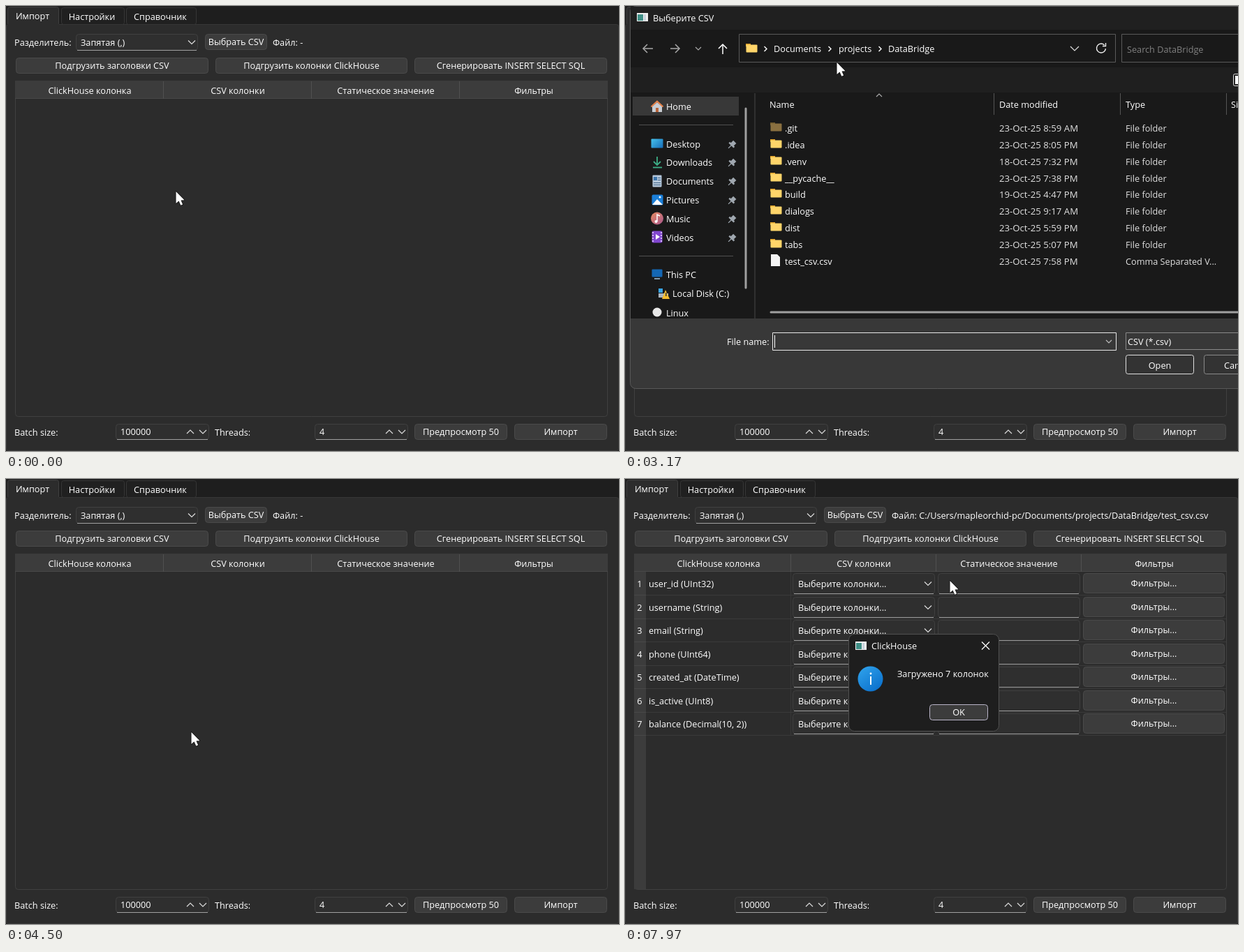
Write an HTML page with a canvas that moves like this. It is 878 by 638 pixels and loops after 8 s.

```html
<!DOCTYPE html>
<html lang="ru">
<meta charset="utf-8">
<title>CSV import</title>
<style>
html, body { margin: 0; width: 100%; height: 100%; overflow: hidden; background: #2c2c2c; }
canvas { display: block; }
</style>
<canvas id="stage" width="878" height="638"></canvas>
<script>
const ctx = document.getElementById('stage').getContext('2d');
const TICK = 200 / 3, LOOP = 8000;
const PATH = 'C:/Users/mapleorchid-pc/Documents/projects/DataBridge/test_csv.csv';

// Cursor way points: time, x, y
const WAY = [
  [0, 243, 266], [433, 243, 266], [1300, 268, 90], [1900, 312, 49], [2900, 312, 49],
  [3300, 296, 111], [3770, 273, 324], [4050, 265, 363], [4700, 265, 363], [5570, 212, 106],
  [5700, 207, 88], [5900, 207, 88], [6430, 467, 333], [6620, 520, 337], [6900, 520, 337],
  [7480, 440, 86], [7680, 440, 86], [7970, 465, 147], [8000, 467, 152],
];

const FILES = [
  ['.git', '23-Oct-25 8:59 AM'], ['.idea', '23-Oct-25 8:05 PM'], ['.venv', '18-Oct-25 7:32 PM'],
  ['__pycache__', '23-Oct-25 7:38 PM'], ['build', '19-Oct-25 4:47 PM'], ['dialogs', '23-Oct-25 9:17 AM'],
  ['dist', '23-Oct-25 5:59 PM'], ['tabs', '23-Oct-25 5:07 PM'], ['test_csv.csv', '23-Oct-25 7:58 PM'],
];
const COLUMNS = ['user_id (UInt32)', 'username (String)', 'email (String)', 'phone (UInt64)',
  'created_at (DateTime)', 'is_active (UInt8)', 'balance (Decimal(10, 2))'];
const HEADERS = ['ClickHouse колонка', 'CSV колонки', 'Статическое значение', 'Фильтры'];

let now = 0, modal = false;

// Monotone cubic through the way points
function cursorAt(t) {
  let i = 0;
  while (i < WAY.length - 2 && t >= WAY[i + 1][0]) i++;
  const slope = (k, c) => k < 0 || k > WAY.length - 2 ? 0
    : (WAY[k + 1][c] - WAY[k][c]) / (WAY[k + 1][0] - WAY[k][0]);
  const tangent = (k, c) => {
    const a = slope(k - 1, c), b = slope(k, c);
    return a * b > 0 ? 2 * a * b / (a + b) : 0;
  };
  const [t0] = WAY[i], span = WAY[i + 1][0] - t0;
  const u = Math.max(0, (t - t0) / span), v = 1 - u;
  return [1, 2].map(c => v * v * (1 + 2 * u) * WAY[i][c] + u * u * (3 - 2 * u) * WAY[i + 1][c]
    + span * u * v * (v * tangent(i, c) - u * tangent(i + 1, c)));
}

const between = (a, b) => now >= a && now < b;

function text(s, x, y, align = 'left', color = '#fff', size = 12.7) {
  ctx.font = `${size}px "Open Sans", "Noto Sans", sans-serif`;
  ctx.textAlign = align;
  ctx.fillStyle = color;
  ctx.fillText(s, x, y + 5);
}

function rect(x, y, w, h, color) {
  ctx.fillStyle = color;
  ctx.fillRect(x, y, w, h);
}

function box(x, y, w, h, radius, fill, stroke) {
  ctx.beginPath();
  ctx.roundRect(x + .5, y + .5, w - 1, h - 1, radius);
  if (fill) { ctx.fillStyle = fill; ctx.fill(); }
  if (stroke) { ctx.strokeStyle = stroke; ctx.lineWidth = 1; ctx.stroke(); }
}

function line(color, width, ...p) {
  ctx.beginPath();
  for (let i = 0; i < p.length; i += 2) ctx.lineTo(p[i], p[i + 1]);
  ctx.strokeStyle = color;
  ctx.lineWidth = width;
  ctx.stroke();
}

function shape(color, ...p) {
  ctx.beginPath();
  for (let i = 0; i < p.length; i += 2) ctx.lineTo(p[i], p[i + 1]);
  ctx.fillStyle = color;
  ctx.fill();
}

function disc(x, y, r, color) {
  ctx.beginPath();
  ctx.arc(x, y, r, 0, 7);
  ctx.fillStyle = color;
  ctx.fill();
}

const chevron = (x, y, s = 5, dir = 1, color = '#ddd') =>
  line(color, 1.2, x - s, y - dir * s / 2, x, y + dir * s / 2, x + s, y - dir * s / 2);
const crumb = x => line('#fff', 1.4, x - 1.5, 58, x + 2, 61.5, x - 1.5, 65);

// Share of the last moments that the cursor spent over the area
function hoverLevel(x, y, w, h) {
  let level = 0;
  for (let k = 0; k < 4; k++) {
    const [cx, cy] = cursorAt(now - k * 45);
    if (cx >= x && cx < x + w && cy >= y && cy < y + h) level += .25;
  }
  const pressed = between(2820, 2960) || between(5820, 5950) || between(6820, 6960) || between(7620, 7760);
  return pressed ? level * .5 : level;
}

function button(x, y, w, h, label, active = !modal, border = '#4a4a4a') {
  box(x, y, w, h, 4, '#3c3c3c', border);
  const level = active ? hoverLevel(x, y, w, h) : 0;
  if (level) box(x, y, w, h, 4, `rgba(255,255,255,${.42 * level})`);
  text(label, x + w / 2, y + h / 2 | 0, 'center');
}

function field(x, y, w, h, value = '') {
  box(x, y, w, h, 4, '#2f2f2f', '#404040');
  line('#a0a0a0', 1, x + 2, y + h - .5, x + w - 2, y + h - .5);
  text(value, x + 7, y + h / 2 | 0);
}

function spin(x, value) {
  field(x, 599, 134, 23, value);
  chevron(x + 107, 610.5, 5, -1);
  chevron(x + 125, 610.5);
}

function mainWindow() {
  rect(0, 0, 878, 638, '#1e1e1e');
  box(0, 26, 878, 612, 3, '#2c2c2c', '#383838');
  box(79, 2, 91, 25, 3, '#202020', '#363636');
  box(172, 2, 101, 25, 3, '#202020', '#363636');
  box(2, 1, 74, 28, 3, '#2c2c2c', '#414141');
  rect(2, 26, 74, 4, '#2c2c2c');
  text('Импорт', 38, 14, 'center');
  text('Настройки', 123, 15, 'center');
  text('Справочник', 221, 15, 'center');

  text('Разделитель:', 12, 52);
  field(100, 40, 175, 24, 'Запятая (,)');
  chevron(266, 52);
  button(285, 40, 89, 23, 'Выбрать CSV');
  text('Файл: ' + (now > 4560 ? PATH : '-'), 382, 52);
  button(14, 74, 276, 23, 'Подгрузить заголовки CSV');
  button(300, 74, 275, 23, 'Подгрузить колонки ClickHouse');
  button(585, 74, 276, 23, 'Сгенерировать INSERT SELECT SQL');

  table(now > 7760);

  text('Batch size:', 12, 611);
  spin(157, '100000');
  text('Threads:', 299, 611);
  spin(442, '4');
  button(585, 599, 133, 23, 'Предпросмотр 50');
  button(728, 599, 133, 23, 'Импорт');
}

function table(filled) {
  const left = filled ? 30 : 14, step = filled ? 208 : 212;
  box(13, 107, 849, 482, 4, '#2c2c2c', '#404040');
  rect(13, 107, 849, 26, '#3c3c3c');
  if (filled) rect(13, 133, 17, 455, '#3c3c3c');
  line('#484848', 1, 13, 132.5, 862, 132.5);
  HEADERS.forEach((title, i) => {
    text(title, left + step * (i + .5) | 0, 121, 'center');
    if (i) line('#505050', 1, left + step * i - .5, 108, left + step * i - .5, 133);
  });
  if (!filled) return;
  line('#383838', 1, 237.5, 133, 237.5, 368);
  COLUMNS.forEach((name, i) => {
    const y = Math.round(150 + i * 33.55), bottom = y + 16.5;
    line('#484848', 1, 13, bottom, 30, bottom);
    line('#3a3a3a', 1, 30, bottom, 861, bottom);
    text(i + 1, 21, y, 'center');
    text(name, 34, y);
    field(240, y - 15, 204, 30);
    text('Выберите колонки...', 248, y);
    chevron(434, y);
    field(448, y - 15, 204, 30);
    button(656, y - 15, 203, 29, 'Фильтры...', false);
  });
}

function appIcon(x, y) {
  rect(x, y, 16, 12, '#f0f0f0');
  rect(x + 1, y + 2, 8, 9, '#3f8f86');
  rect(x + 10, y + 2, 3, 9, '#c9d3dc');
}

function folder(x, y, dim) {
  rect(x, y - 6, 7, 4, dim ? '#6f5a2c' : '#e3a52c');
  box(x, y - 5, 17, 12, 1, dim ? '#8a7040' : '#ffd56a');
}

function pin(x, y) {
  ctx.save();
  ctx.translate(x, y);
  ctx.rotate(Math.PI / 4);
  rect(-3, -6, 6, 6, '#a0a8b0');
  rect(-5, -1, 10, 2.5, '#a0a8b0');
  rect(-.6, 1, 1.2, 6, '#a0a8b0');
  ctx.restore();
}

function sidebar() {
  rect(11, 130, 152, 27, '#383838');
  shape('#c9ced4', 39, 144, 46, 138, 53, 144, 53, 152, 39, 152);
  line('#e8834a', 2, 37.5, 144.5, 46, 136.5, 54.5, 144.5);
  rect(44, 146, 4, 6, '#b8643a');
  text('Home', 59, 144);
  line('#505050', 1, 20, 170.5, 155, 170.5);
  line('#505050', 1, 20, 358.5, 155, 358.5);
  box(171, 145, 4, 261, 2, '#a0a0a0');
  ['Desktop', 'Downloads', 'Documents', 'Pictures', 'Music', 'Videos'].forEach((name, i) => {
    const y = Math.round(197.5 + i * 26.8);
    text(name, 59, y);
    pin(153, y + 1);
  });
  const blue = ctx.createLinearGradient(38, 190, 54, 206);
  blue.addColorStop(0, '#46c3ee');
  blue.addColorStop(1, '#1467b4');
  box(37, 190, 18, 14, 1, blue);
  line('#3dae86', 1.8, 46, 216, 46, 228);
  line('#3dae86', 1.8, 41, 223, 46, 228, 51, 223);
  line('#3dae86', 1.8, 40, 231.5, 53, 231.5);
  box(39, 242, 14, 18, 1, '#b4c6d9');
  rect(41, 245, 5, 5, '#3c75ab');
  for (const y of [246, 249, 253, 256]) rect(y < 250 ? 47 : 41, y, y < 250 ? 4 : 10, 1, '#46688a');
  box(38, 270, 17, 16, 2, '#1b7fd8');
  shape('#fff', 39, 285, 46, 277, 54, 285);
  disc(50, 274, 1.5, '#fff');
  const rose = ctx.createLinearGradient(38, 296, 54, 314);
  rose.addColorStop(0, '#e58a62');
  rose.addColorStop(1, '#a8578c');
  disc(46, 304.5, 9, rose);
  line('#fff', 1.5, 46, 309, 46, 299, 50, 301);
  disc(44.5, 309, 2, '#fff');
  box(38, 322, 16, 18, 2, '#8146cf');
  shape('#fff', 44, 327, 50, 331, 44, 335);
  for (let y = 324; y < 339; y += 4) { rect(39, y, 2, 2, '#d3b8f5'); rect(51, y, 2, 2, '#d3b8f5'); }

  box(38, 377, 16, 12, 1, blue);
  rect(42, 390, 8, 2, '#7f99ad');
  text('This PC', 59, 385);
  rect(48, 405, 6, 6, '#38a5e8');
  rect(48, 412, 14, 6, '#aab4bd');
  shape('#f5bd2f', 58, 407, 64, 420, 53, 420);
  rect(58, 411, 1.5, 5, '#333');
  text('Local Disk (C:)', 68, 412);
  disc(46, 439, 6.5, '#e8e8e8');
  text('Linux', 59, 440);
}

function fileList(cx, cy) {
  const ready = now > 3360, shift = ready ? 0 : -1;
  const clicked = now > 4090;
  for (const x of [528.5, 709.5, 861.5]) line('#555', 1, x, 125, x, 156);
  text('Name', 207, 142 + shift);
  text('Date modified', 536, 142 + shift);
  text('Type', 717, 142 + shift);
  text('Si', 868, 142 + shift);
  chevron(364, 128, 4, -1, '#aaa');
  const hovered = ready && cx > 203 ? Math.floor((cy - 164) / 23.9) : -1;
  FILES.forEach(([name, date], i) => {
    const y = Math.round(176 + i * 23.85) + shift;
    if (i === hovered) rect(203, y - 13, 675, 25, clicked ? '#777' : '#4d4d4d');
    if (i < 8) folder(208, y - 2, i === 0);
    else {
      shape('#f4f4f4', 209, y - 10, 218, y - 10, 222, y - 6, 222, y + 7, 209, y + 7);
      if (ready) for (let k = -5; k < 5; k += 3) rect(211, y + k, 9, 1, '#a0a8b0');
    }
    text(name, 229, y);
    text(date, 536, y, 'left', '#e0e0e0', 13.2);
    text(i < 8 ? 'File folder' : 'Comma Separated V...', 717, y, 'left', '#e0e0e0');
  });
  box(207, 437, 690, 4, 2, '#a0a0a0');
}

function fileDialog(cx, cy) {
  const ready = now > 3360;
  ctx.save();
  ctx.globalAlpha = between(4360, 4420) ? .5 : Math.min(1, (now - 2900) / 180);
  box(7, 0, 890, 549, 8, '#383838', '#585858');
  ctx.beginPath();
  ctx.rect(8, 1, 870, 447);
  ctx.clip();
  rect(8, 1, 870, 447, '#191919');
  rect(8, 1, 870, 33, '#202020');
  rect(8, 88, 870, 36, '#1f1f1f');
  appIcon(17, 10);
  text('Выберите CSV', 40, 17);

  const grey = '#a8a8a8';
  line(grey, 1.5, 40, 61, 26, 61);
  line(grey, 1.5, 32, 55, 26, 61, 32, 67);
  line(grey, 1.5, 65, 61, 78, 61);
  line(grey, 1.5, 72, 55, 78, 61, 72, 67);
  chevron(105, 61, 4, 1, grey);
  line('#fff', 1.5, 140, 69, 140, 55);
  line('#fff', 1.5, 134, 61, 140, 55, 146, 61);
  box(163, 40, 540, 41, 0, '#191919', '#5a5a5a');
  folder(173, 60);
  [201, 293, 365].forEach(crumb);
  if (ready) crumb(455);
  text('Documents', 213, 61);
  text('projects', 306, 61);
  text('DataBridge', 377, 61);
  chevron(644, 61, 6);
  ctx.beginPath();
  ctx.arc(682, 60.5, 6.5, .1, 5.5);
  ctx.strokeStyle = '#eee';
  ctx.lineWidth = 1.4;
  ctx.stroke();
  line('#eee', 1.4, 688.5, 53, 688.5, 57.5, 684, 57.5);
  box(711, 40, 180, 41, 0, '#191919', '#5a5a5a');
  text('Search DataBridge', 719, 62, 'left', '#808080');

  if (ready) {
    text('Organize', 29, 107);
    shape('#ddd', 87, 105, 94, 105, 90.5, 109);
    text('New folder', 127, 107);
    box(814, 97, 18, 18, 1, '#c8c8c8');
    for (let y = 101; y < 114; y += 4) rect(815, y, 16, 1, '#444');
    shape('#ddd', 841, 105, 848, 105, 844.5, 109);
  }
  box(871, 97, 20, 18, 2, '#222', '#ddd');
  rect(874, 100, 4, 12, '#fff');
  line('#303030', 2, 186, 125, 186, 448);
  sidebar();
  if (now > 3090) fileList(cx, cy);
  ctx.restore();

  if (now < 3090 || between(4360, 4420)) return;
  text('File name:', 146, 481);
  box(211, 468, 493, 26, 0, '#383838', '#e8e8e8');
  if (now > 4160) text('test_csv.csv', 215, 481);
  else line('#fff', 1, 214.5, 472, 214.5, 490);
  chevron(693, 481, 4, 1, '#bbb');
  box(717, 468, 190, 25, 0, '#383838', '#8a8a8a');
  text('CSV (*.csv)', 720, 481);
  box(717, 500, 98, 28, 3, '#333', '#e0e0e0');
  text('Open', 766, 515, 'center');
  box(829, 500, 98, 28, 3, '#333', '#8a8a8a');
  text('Cancel', 858, 515);
}

function messageBox(x, w, title, message) {
  box(x, 222, w, 140, 8, '#1e1e1e', '#505050');
  appIcon(x + 10, 233);
  text(title, x + 33, 239);
  const cross = x + w - 19.5;
  line('#fff', 1.2, cross - 5.5, 233.5, cross + 5.5, 244.5);
  line('#fff', 1.2, cross - 5.5, 244.5, cross + 5.5, 233.5);
  const blue = ctx.createLinearGradient(x + 18, 270, x + 44, 304);
  blue.addColorStop(0, '#2ea0ea');
  blue.addColorStop(1, '#0a6fcb');
  disc(x + 31.5, 286.5, 18, blue);
  rect(x + 31, 283, 2, 12, '#fff');
  disc(x + 32, 279, 1.4, '#fff');
  text(message, x + 70, 279);
  button(x + w - 100, 323, 84, 23, 'OK', true, '#b9b5c8');
}

function pointer(x, y) {
  ctx.save();
  ctx.translate(x + .5, y);
  ctx.lineJoin = 'round';
  ctx.beginPath();
  for (const [px, py] of [[0, 0], [0, 17], [4, 13.5], [6.8, 19.8], [9.6, 18.6], [7, 12.5], [12, 12.3]])
    ctx.lineTo(px, py);
  ctx.closePath();
  ctx.fillStyle = '#fff';
  ctx.strokeStyle = '#111';
  ctx.lineWidth = 1.6;
  ctx.stroke();
  ctx.fill();
  ctx.restore();
}

function draw() {
  const t = performance.now() % LOOP;
  now = Math.max(0, Math.floor((t + 37) / TICK) * TICK - TICK / 2);
  const [cx, cy] = cursorAt(now).map(Math.round);
  const choosing = between(2960, 4420);
  const headersShown = between(5960, 6960), columnsShown = now > 7820;
  modal = choosing || headersShown || columnsShown;
  mainWindow();
  if (choosing) fileDialog(cx, cy);
  if (headersShown) messageBox(264, 328, 'CSV', 'user, password, info, ip, ping, target, data');
  if (columnsShown) messageBox(320, 216, 'ClickHouse', 'Загружено 7 колонок');
  pointer(cx, cy);
  requestAnimationFrame(draw);
}
draw();
</script>
</html>
```
